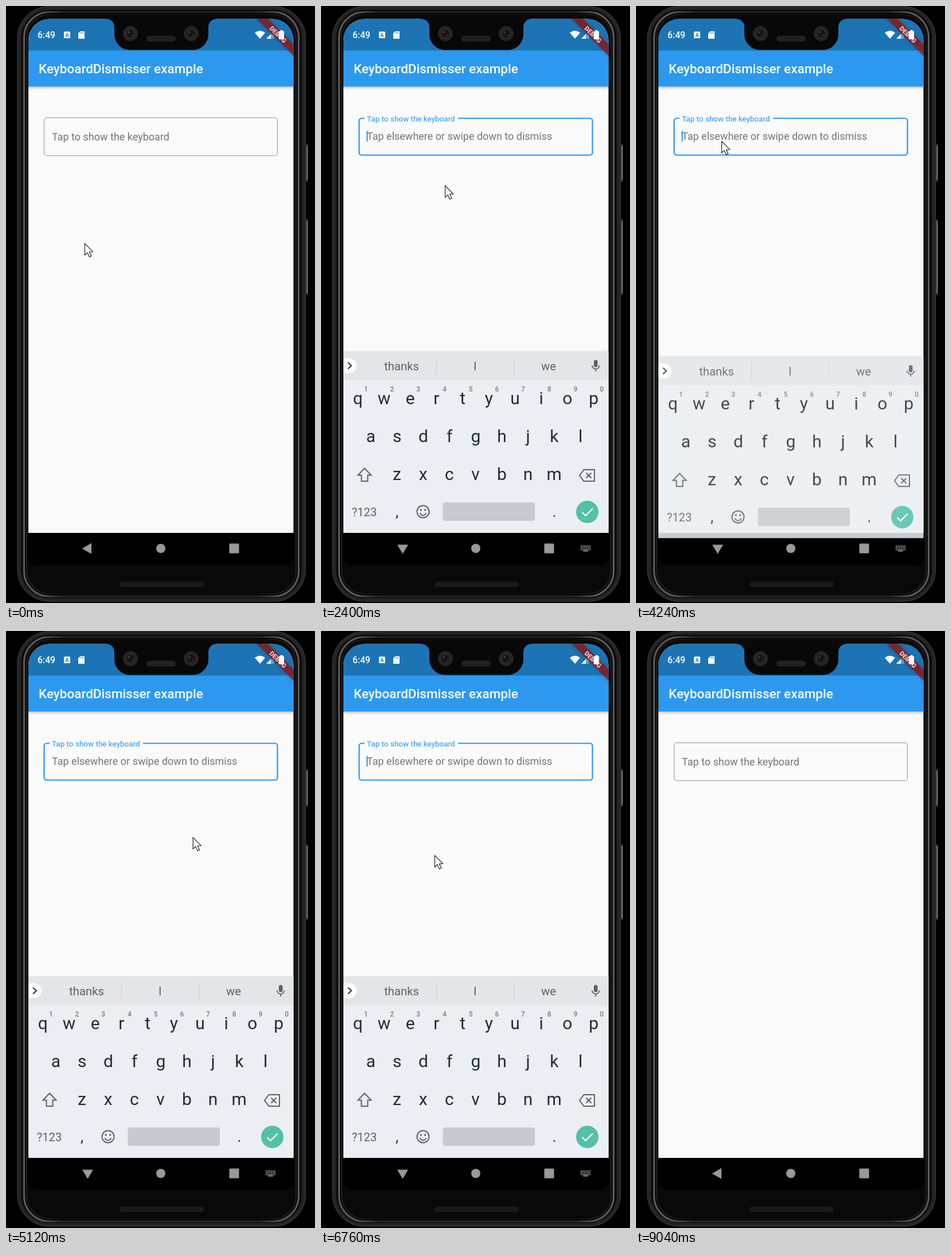
These frames come from a looping animation (539 by 1039 pixels, 9.8 s). An HTML page with a canvas:

```html
<!DOCTYPE html>
<html lang="en">
<head>
<meta charset="utf-8">
<title>KeyboardDismisser example</title>
<style>
html, body { margin: 0; width: 100%; height: 100%; overflow: hidden; background: #000; }
canvas { display: block; }
</style>
</head>
<body>
<canvas id="stage" width="539" height="1039"></canvas>
<script>
const W = 539, H = 1039, LOOP = 9800;
const BLUE = '#2b95e9', NAV = '#999', INK = '#1f2d34', SOFT = '#56636a';
const stage = document.getElementById('stage').getContext('2d');

// [focus, blur] times of the text field
const sessions = [[1840, 2880], [4000, 5400], [6240, 8560]];
// pointer stops: time, x, y
const stops = [
  [0, 137, 413], [80, 137, 413], [1640, 204, 238], [1960, 204, 238],
  [2760, 225, 367], [3400, 225, 367], [3760, 149, 235], [4360, 149, 235],
  [5140, 326, 359], [5440, 326, 359], [6060, 223, 219], [6360, 223, 219],
  [6740, 198, 390], [7100, 196, 412], [7400, 196, 412], [8200, 327, 330],
  [8560, 327, 330], [8900, 327, 470]
];
const POINTER_END = 9030;

const clamp = v => Math.max(0, Math.min(1, v));
const mix = (a, b, k) => a + (b - a) * k;
const smooth = k => k * k * (3 - 2 * k);

function layer(draw) {
  const c = document.createElement('canvas');
  c.width = W;
  c.height = H;
  draw(c.getContext('2d'));
  return c;
}

function box(g, x, y, w, h, r, fill, stroke, lw = 1) {
  g.beginPath();
  g.roundRect(x, y, w, h, r);
  paint(g, fill, stroke, lw);
}

function disc(g, x, y, r, fill, stroke, lw = 1) {
  g.beginPath();
  g.arc(x, y, r, 0, 7);
  paint(g, fill, stroke, lw);
}

function poly(g, pts, fill, stroke, lw = 1, open = false) {
  g.beginPath();
  pts.forEach(([x, y]) => g.lineTo(x, y));
  if (!open) g.closePath();
  paint(g, fill, stroke, lw);
}

function paint(g, fill, stroke, lw) {
  if (fill) { g.fillStyle = fill; g.fill(); }
  if (stroke) { g.strokeStyle = stroke; g.lineWidth = lw; g.stroke(); }
}

function text(g, s, x, y, size, color, align = 'left', weight = 400) {
  g.font = `${weight} ${size}px Roboto, sans-serif`;
  g.textAlign = align;
  g.fillStyle = color;
  g.fillText(s, x, y);
}

function screenPath(g) {
  g.beginPath();
  g.roundRect(39, 22.5, 462.5, 949, [37, 37, 16, 16]);
}

function mesh(g, x, y, w, h, color) {
  g.save();
  g.beginPath();
  g.roundRect(x, y, w, h, h / 2);
  g.fillStyle = '#151515';
  g.fill();
  g.clip();
  g.fillStyle = color;
  for (let j = 0; j < h; j += 2)
    for (let i = j % 4 / 2; i < w; i += 2) g.fillRect(x + i, y + j, 1, 1);
  g.restore();
}

// metal rim: bright on the sides, dim along the top and bottom
function rim(g, side, middle) {
  const grad = g.createLinearGradient(20, 0, 523, 0);
  grad.addColorStop(0, side);
  grad.addColorStop(.08, side);
  grad.addColorStop(.16, middle);
  grad.addColorStop(.84, middle);
  grad.addColorStop(.92, side);
  grad.addColorStop(1, side);
  return grad;
}

function drawFrame(g) {
  g.fillStyle = '#000';
  g.fillRect(0, 0, W, H);
  for (const [y, h] of [[240, 66], [371, 132]]) {
    box(g, 519, y, 8, h, 2, '#2a2a2a');
    g.fillStyle = '#8a8a8a';
    g.fillRect(524.5, y + 3, 1.5, h - 6);
  }
  box(g, 20, 1, 502.5, 1035, 56, '#242424', '#343434', 1.5);
  box(g, 27.5, 7.5, 487.5, 1022, 48, '#080808', '#0c0c0c', 2);
  box(g, 31.5, 10.5, 479, 1017, 44, '#090909', rim(g, '#5c5c5c', '#242424'), 3);
  box(g, 36, 15, 470, 1008, 40, '#090909', rim(g, '#1e1e1e', '#0c0c0c'), 2);
  box(g, 38, 21, 465, 952, [38, 38, 17, 17], '#000');
  mesh(g, 198, 1002, 147, 9, '#2b2b2b');
}

function drawStatus(g) {
  text(g, '6:49', 55, 56, 15.75, '#fff', 'left', 500);
  box(g, 101, 44.5, 11, 11.5, 1.5, '#fff');
  text(g, 'A', 106.5, 53.8, 9, '#1c74b5', 'center', 700);
  poly(g, [[129.5, 44], [137, 44], [137, 57], [126, 57], [126, 47.5]], '#fff');
  g.fillStyle = '#1c74b5';
  for (const x of [129.5, 131.8, 134.1]) g.fillRect(x, 45.5, 1, 2.5);

  g.beginPath();
  g.moveTo(443, 57);
  g.lineTo(434, 46.5);
  g.quadraticCurveTo(443, 39.5, 452, 46.5);
  g.closePath();
  paint(g, '#fff');
  poly(g, [[454, 57], [467.5, 43.5], [467.5, 57]], 'rgba(255,255,255,.35)');
  poly(g, [[454, 57], [462, 49], [462, 57]], '#fff');
}

function drawBanner(g) {
  g.save();
  g.translate(501.5, 22.5);
  g.rotate(Math.PI / 4);
  g.shadowColor = 'rgba(0,0,0,.6)';
  g.shadowBlur = 6;
  g.fillStyle = 'rgba(0,0,0,.4)';
  g.fillRect(-60, 31.5, 120, 13.5);
  g.shadowColor = 'transparent';
  g.fillStyle = 'rgba(183,28,28,.627)';
  g.fillRect(-60, 31.5, 120, 13.5);
  text(g, 'DEBUG', 0, 42.3, 11.3, '#e3cbd3', 'center', 900);
  g.restore();
}

function drawNotch(g) {
  g.beginPath();
  g.moveTo(172, 21);
  g.lineTo(174, 22.5);
  g.arcTo(189, 22.5, 189, 40, 14);
  g.arcTo(189, 76.5, 271, 76.5, 27);
  g.arcTo(353, 76.5, 353, 40, 27);
  g.arcTo(353, 22.5, 368, 22.5, 14);
  g.lineTo(370, 21);
  g.closePath();
  paint(g, '#080808');
  for (const x of [217, 323]) {
    disc(g, x, 48, 12.5, '#272323', '#302c2c');
    disc(g, x, 48, 7.5, '#171414', '#3c3434');
    disc(g, x - 3, 45.5, 1.5, '#574c48');
    disc(g, x + 3, 51, 1.2, '#453c3a');
  }
  mesh(g, 245, 52, 51, 10, '#484848');
}

const phone = layer(g => {
  drawFrame(g);
  g.save();
  screenPath(g);
  g.clip();
  g.fillStyle = '#fafafa';
  g.fillRect(38, 22, 465, 895);
  g.fillStyle = '#000';
  g.fillRect(38, 917, 465, 60);
  g.save();
  g.shadowColor = 'rgba(0,0,0,.34)';
  g.shadowBlur = 5;
  g.shadowOffsetY = 1.5;
  g.fillStyle = '#2c99ee';
  g.fillRect(30, 70, 482, 70);
  g.restore();
  g.fillStyle = '#1c74b5';
  g.fillRect(38, 22, 465, 55.5);
  text(g, 'KeyboardDismisser example', 57, 117, 22.5, '#fff', 'left', 500);
  drawStatus(g);
  drawBanner(g);
  box(g, 476, 43.5, 9, 14.5, 1.5, '#fff');
  g.fillStyle = '#fff';
  g.fillRect(478.5, 42, 4, 2);
  g.restore();
  drawNotch(g);
});

const keyboard = layer(g => {
  g.save();
  g.shadowColor = 'rgba(0,0,0,.12)';
  g.shadowBlur = 3;
  g.fillStyle = '#ebeef2';
  g.fillRect(38, 601, 465, 316);
  g.restore();
  g.fillStyle = '#e3e5e9';
  g.fillRect(38, 601, 465, 50);

  // suggestion strip
  box(g, 30, 613, 32, 26, 13, '#fff');
  poly(g, [[47, 620.5], [53, 626], [47, 631.5]], null, '#263238', 2, true);
  ['thanks', 'I', 'we'].forEach((s, i) => text(g, s, 140.5 + i * 128.3, 633.5, 20.25, SOFT, 'center'));
  g.fillStyle = '#c8cbcf';
  g.fillRect(201, 612, 1, 28);
  g.fillRect(336.5, 612, 1, 28);
  box(g, 476, 616, 6.5, 12.5, 3.2, SOFT);
  g.beginPath();
  g.arc(479.2, 625.5, 6.3, 0, Math.PI);
  g.moveTo(479.2, 632);
  g.lineTo(479.2, 636);
  paint(g, null, SOFT, 1.8);

  // letters
  const step = 45.7;
  const rows = [['qwertyuiop', 64.3], ['asdfghjkl', 87], ['zxcvbnm', 132.5]];
  rows.forEach(([keys, x0], r) => [...keys].forEach((k, i) => {
    const x = x0 + i * step;
    text(g, k, x, 692.5 + r * 66, 30, INK, 'center');
    if (!r) text(g, (i + 1) % 10, x + 14, 671, 12, '#747f86', 'center', 500);
  }));

  // shift and backspace
  poly(g, [[76, 804.5], [87.5, 816.5], [81.5, 816.5], [81.5, 827], [70.5, 827], [70.5, 816.5], [64.5, 816.5]], null, SOFT, 2);
  poly(g, [[451, 817], [458.5, 807], [477, 807], [477, 827], [458.5, 827]], null, SOFT, 2);
  poly(g, [[462.5, 812.5], [471.5, 821.5]], null, SOFT, 2);
  poly(g, [[471.5, 812.5], [462.5, 821.5]], null, SOFT, 2);

  // bottom row
  text(g, '?123', 75.5, 887.5, 20.25, SOFT, 'center');
  text(g, ',', 132.5, 889, 26, INK, 'center');
  text(g, '.', 407, 889, 26, INK, 'center');
  disc(g, 178, 880, 10.5, null, SOFT, 2);
  disc(g, 174.3, 877, 1.7, SOFT);
  disc(g, 181.7, 877, 1.7, SOFT);
  g.beginPath();
  g.arc(178, 881, 5.5, .2, Math.PI - .2);
  paint(g, null, SOFT, 1.8);
  box(g, 212.5, 864, 160.5, 32, 4, '#c7cacf');
  disc(g, 464.5, 880.5, 19.5, '#53c0a9');
  poly(g, [[455.5, 881], [461.5, 887], [474, 874.5]], null, '#fff', 2.2, true);
});

// progress of the field, keyboard and caret at time t
function poseAt(t) {
  const pose = { focus: 0, kb: 0, nav: false, caret: false };
  for (const [on, off] of sessions) {
    if (t < on || t > off + 600) continue;
    const show = on + 176, hide = off + 90;
    pose.focus = t < off ? smooth(clamp((t - on) / 200)) : 1 - smooth(clamp((t - off) / 200));
    pose.nav = t >= show && t < hide;
    if (t >= show)
      pose.kb = t < hide ? 1 - (1 - clamp((t - show) / 200)) ** 5 : 1 - clamp((t - hide) / 200) ** 5;
    const blink = Math.max(0, t - on - 400);
    pose.caret = t < off && Math.floor(blink / 500) % 2 === 0;
  }
  return pose;
}

function drawField(g, k, caret) {
  const l = 66.5, r = 473.5, top = mix(194.5, 195.5, k), bot = mix(260.5, 259.5, k), c = 4.5;
  const gap = 163 * k;
  g.beginPath();
  g.moveTo(76 + gap, top);
  g.arcTo(r, top, r, bot, c);
  g.arcTo(r, bot, l, bot, c);
  g.arcTo(l, bot, l, top, c);
  g.arcTo(l, top, r, top, c);
  g.lineTo(76, top);
  const tone = (a, b) => `rgb(${a.map((v, i) => Math.round(mix(v, b[i], k)))})`;
  paint(g, null, tone([152, 152, 152], [43, 149, 233]), mix(1.1, 2.2, k));

  if (k > 0) {
    g.globalAlpha = k;
    text(g, 'Tap elsewhere or swipe down to dismiss', 80, 232.5, 18, '#757575');
    g.globalAlpha = 1;
  }
  text(g, 'Tap to show the keyboard', 80, mix(233.7, 201.2, k), mix(18, 13.5, k),
    tone([117, 117, 117], [43, 149, 233]));
  if (caret) {
    g.fillStyle = BLUE;
    g.fillRect(79.5, 217.5, 2, 18.5);
  }
}

function drawNav(g, open) {
  poly(g, open ? [[133, 937.5], [152, 937.5], [142.5, 953.5]] : [[132.7, 944.2], [149, 934.8], [149, 953.6]], NAV);
  disc(g, 270, 944, 8, NAV);
  box(g, 389.5, 935.5, 17, 17, 1.5, NAV);
  if (!open) return;
  g.fillStyle = NAV;
  for (let j = 0; j < 3; j++)
    for (let i = 0; i < 6; i++) g.fillRect(453 + i * 3, 939 + j * 3, 2, 2);
  g.fillRect(457, 947.5, 9, 1.8);
}

function drawPointer(g, t) {
  if (t > POINTER_END) return;
  let i = 0;
  while (i < stops.length - 2 && stops[i + 1][0] <= t) i++;
  const [t0, x0, y0] = stops[i], [t1, x1, y1] = stops[i + 1];
  const k = smooth(clamp((t - t0) / (t1 - t0)));
  g.save();
  g.translate(mix(x0, x1, k) + .5, mix(y0, y1, k) + .5);
  poly(g, [[0, 0], [0, 20], [4.6, 15.8], [8, 23.2], [11.3, 21.7], [8, 14.5], [14, 14.2]], '#fff', '#111', 1.1);
  g.restore();
}

function draw(t) {
  const g = stage, pose = poseAt(t);
  g.drawImage(phone, 0, 0);
  drawField(g, pose.focus, pose.caret);
  if (pose.kb > 0) {
    g.save();
    screenPath(g);
    g.clip();
    g.globalAlpha = pose.kb;
    g.drawImage(keyboard, 0, 65 * (1 - pose.kb));
    g.restore();
  }
  drawNav(g, pose.nav);
  drawPointer(g, t);
}

const start = performance.now();
function tick() {
  draw((performance.now() - start) % LOOP);
  requestAnimationFrame(tick);
}
tick();
</script>
</body>
</html>
```
